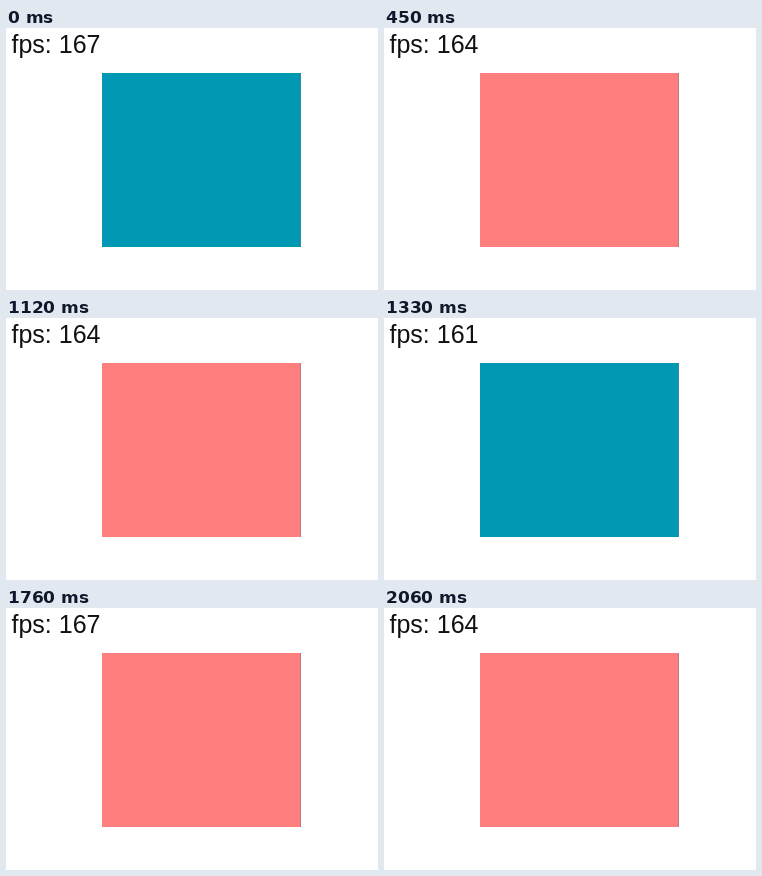
Animation of 372x262 px, one loop 2.09 s. Source, as an HTML page:

```html
<!DOCTYPE html>
<html lang="en">
<head>
<meta charset="utf-8">
<title>Flicker</title>
<style>
  html, body { margin: 0; height: 100%; overflow: hidden; background: #fff; }
  svg { display: block; width: 372px; height: 262px; }
  text { font: 25px "Liberation Sans", Arial, sans-serif; fill: #111; }
</style>
</head>
<body>
<svg viewBox="0 0 372 262">
  <text id="label" x="5.5" y="25"></text>
  <rect id="box" x="96" y="45" width="199" height="174"/>
  <path d="M294.5 45V219" stroke="#6f7f80" stroke-opacity=".5"/>
</svg>
<script>
const LOOP = 2090, TICK = 30;
const COLORS = ["#0098b2", "#ff7f7f"];

// Ticks each state is held for
const holds = "11212111122121111111312213212111111211112111222211";
// Ticks that run 10 ms late, by state
const late = [12, 35];
// States where only the reading changes
const steady = [22, 37];
const readings = { 0: 167, 4: 159, 10: 161, 15: 167, 22: 161, 28: 167, 31: 161, 37: 167, 43: 167, 46: 161 };

let end = 0;
const states = [...holds].map((n, i) => {
  end += n * TICK + (late.includes(i) ? 10 : 0);
  const flips = i + steady.filter(s => s <= i).length;
  return { end, color: COLORS[flips % 2], fps: readings[i] ?? 164 };
});

const label = document.getElementById("label");
const box = document.getElementById("box");
const start = performance.now();

function draw() {
  const t = (performance.now() - start) % LOOP;
  const { color, fps } = states.find(s => t < s.end);
  box.setAttribute("fill", color);
  label.textContent = `fps: ${fps}`;
  requestAnimationFrame(draw);
}
draw();
</script>
</body>
</html>
```
